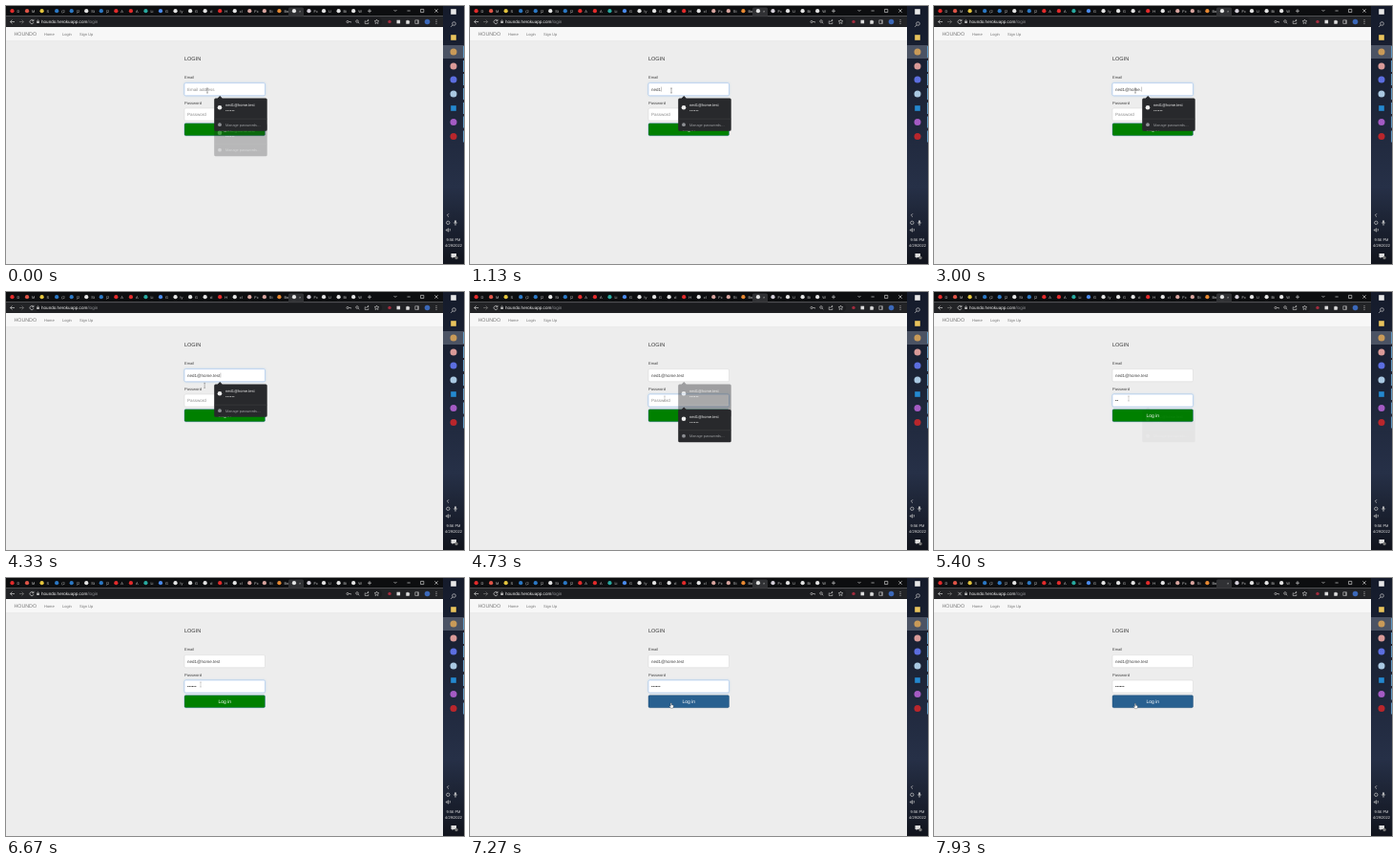
Recreate the animation shown at these times as an HTML page. Size 480 px wide and 270 px high, loop 8000 ms.

```html
<!DOCTYPE html>
<html lang="en">
<head>
<meta charset="utf-8">
<title>Login</title>
<style>
html, body { margin: 0; width: 100%; height: 100%; overflow: hidden; background: #ededed; }
svg { display: block; width: 100vw; height: 100vh; text-rendering: geometricPrecision;
  font: 4px "Liberation Sans", Arial, sans-serif; }
text { white-space: pre; }
.line { fill: none; stroke: #ccc; stroke-width: .7; }
.typed { font-size: 4.5px; }
.field { fill: #fff; stroke: #ccc; stroke-width: .4; }
.field.focus { stroke: #8fb6e8; stroke-width: .45; filter: drop-shadow(0 0 .8px #66afe966); }
</style>
</head>
<body>
<svg viewBox="0 0 480 270">
  <defs>
    <linearGradient id="night" x2="0" y2="1">
      <stop stop-color="#151b2b"/>
      <stop offset=".35" stop-color="#1c2437"/>
      <stop offset=".7" stop-color="#263047"/>
      <stop offset="1" stop-color="#11141d"/>
    </linearGradient>
    <g id="popup">
      <path d="M219.7 96.500h2l2.500-2.500 2.500 2.500h45.500q1.500 0 1.500 1.500v31.200q0 1.500-1.500 1.500h-52.500q-1.500 0-1.500-1.500v-31.200q0-1.500 1.500-1.500z" fill="#28292c"/>
      <path d="M218.200 118.200h55.500" stroke="#404145" stroke-width=".5"/>
      <circle cx="224" cy="106.200" r="2.300" fill="#eee"/>
      <text x="230" y="105" fill="#e8e8e8">ned1@home.test</text>
      <text x="230" y="111.300" fill="#aaa" font-size="4.600">••••••</text>
      <circle cx="224" cy="124.200" r="1.900" fill="#8d8f93"/>
      <text x="230" y="125.900" fill="#9a9c9f" font-size="3.800">Manage passwords…</text>
    </g>
  </defs>

  <!-- page -->
  <rect width="480" height="270" fill="#ededed"/>
  <rect y="22" width="458" height="14.500" fill="#f7f7f7"/>
  <path d="M0 36.600h458" stroke="#e2e2e2" stroke-width=".5"/>
  <g fill="#777">
    <text x="8.500" y="31.400" font-size="5.300">HOUNDO</text>
    <text x="40" y="31">Home</text>
    <text x="59" y="31">Login</text>
    <text x="77" y="31">Sign Up</text>
  </g>
  <g fill="#444">
    <text x="187" y="57" font-size="5.500" fill="#333">LOGIN</text>
    <text x="187" y="76.200">Email</text>
    <text x="187" y="102.700" font-size="4.100">Password</text>
  </g>
  <rect id="emailBox" class="field" x="187" y="80.600" width="84.500" height="13.200" rx="1.400"/>
  <rect id="passBox" class="field" x="187" y="107" width="84.500" height="13" rx="1.400"/>
  <text id="email" class="typed" x="190" y="88.800"/>
  <path id="caret" d="M0 84.600v5" stroke="#555" stroke-width=".4"/>
  <text id="pass" class="typed" x="190" y="115.100"/>
  <rect id="button" x="187" y="122.700" width="84.500" height="13" rx="1.400" stroke-width=".4"/>
  <text x="229.200" y="131" font-size="5" fill="#fff" text-anchor="middle">Log in</text>

  <use id="ghost" href="#popup" y="26.500"/>
  <use id="emailPopup" href="#popup"/>
  <use id="passPopup" href="#popup" y="26.500"/>

  <!-- browser bars -->
  <rect width="458" height="10.500" fill="#0d0e10"/>
  <path d="M296 10.500v-7.500q0-1.500 1.500-1.500h13q1.500 0 1.500 1.500v7.500z" fill="#303134"/>
  <g id="tabs"/>
  <path class="line" d="M379 5.200h4M381 3.200v4M406.500 4l1.500 1.500L409.500 4M420.500 5h3.200M434.600 3.400h3.200v3.200h-3.200zM449.300 3.300l3.400 3.400m0-3.400l-3.400 3.400"/>
  <rect y="10.500" width="458" height="11.500" fill="#222326"/>
  <rect x="31" y="12" width="363" height="8.800" rx="4.400" fill="#1b1c1f"/>
  <path class="line" d="M9 16.500h-4.500m2-2l-2 2 2 2"/>
  <path class="line" style="stroke:#777" d="M14 16.500h4.500m-2-2l2 2-2 2"/>
  <path id="reload" class="line"/>
  <rect x="32.200" y="15.800" width="2.600" height="2.200" fill="#bbb"/>
  <path class="line" style="stroke-width:.5" d="M32.800 15.800v-.8q.7-1.200 1.400 0v.8"/>
  <text x="37" y="18.100" font-size="4.600" fill="#eee">houndo.herokuapp.com<tspan fill="#8b8d91">/login</tspan></text>
  <g class="line" style="stroke-width:.6">
    <circle cx="358" cy="16.500" r="1.100"/><path d="M359 16.500h2.500v1"/>
    <circle cx="368" cy="16" r="1.300"/><path d="M369 17l1.300 1.300"/>
    <path d="M377 15.800h-.800v2.700h3.600v-1.500M377.500 17q.300-2 2.500-2m-1-1l1.200 1-1.200 1"/>
    <path d="M388.500 14l.7 1.600 1.700.1-1.300 1.100.4 1.700-1.500-.9-1.500.9.4-1.700-1.300-1.100 1.700-.1z"/>
    <path d="M428.800 14.800h3.600v3.600h-3.600zM431.600 14.800v3.600"/>
  </g>
  <circle cx="402" cy="16.400" r="1.700" fill="#a32c3d"/>
  <rect x="409.500" y="14.700" width="3.600" height="3.600" fill="#ddd"/>
  <path d="M419.300 15.200h1.100q.6-1.600 1.200 0h1.100v1.100q1.600.6 0 1.200v1.200h-3.400z" fill="#ddd"/>
  <circle cx="441.500" cy="16.500" r="2.800" fill="#3b68b8"/>
  <path d="M451 14.300v4.600" stroke="#ccc" stroke-width=".9" stroke-dasharray=".9"/>

  <!-- taskbar -->
  <rect x="458" width="22" height="270" fill="url(#night)"/>
  <rect x="458" y="41" width="22" height="14" fill="#4b5364"/>
  <g id="apps"/>
  <g class="line">
    <circle cx="469.500" cy="18.500" r="1.800"/><path d="M468.200 19.900l-2 2"/>
    <path d="M464 217.300l-1.700 1.700 1.700 1.700"/>
    <circle cx="463.300" cy="226.800" r="1.700"/>
    <path d="M469.300 226.500q1.700 3.500 3.400 0M471 228.300v1.500"/>
    <path d="M461.300 234h1l1.300-1.200v3.400l-1.300-1.200h-1zM465 233q1 1.300 0 2.600"/>
  </g>
  <rect x="470.200" y="224.200" width="1.600" height="3.200" rx=".8" fill="#ddd"/>
  <g fill="#e5e5e5" text-anchor="middle">
    <text x="469" y="246">9:56 PM</text>
    <text x="469" y="251.500">4/29/2022</text>
  </g>
  <path d="M466.500 259h5.500v4h-3l-1.300 1.300v-1.300h-1.200z" fill="#ddd"/>
  <circle cx="472" cy="263.500" r="1.700" fill="#777"/>

  <path id="beam" d="M-.9-2.500h1.800M0-2.500v5M-.9 2.500h1.800" fill="none" stroke="#333" stroke-width=".45"/>
  <path id="hand" d="M-.6-1.500q.6-.7 1.100 0v1.800l1.900.5v1.500l-.7 1.400h-2.100l-1.400-2 .4-.5.8.6z" fill="#fff" stroke="#222" stroke-width=".3"/>
</svg>
<script>
const $ = id => document.getElementById(id);
const set = (id, attrs) => { for (const k in attrs) $(id).setAttribute(k, attrs[k]); };
const clamp = x => Math.min(1, Math.max(0, x));
const ramp = (t, a, b) => clamp((t - a) / (b - a));
const ease = x => x * x * (3 - 2 * x);

const red = '#e32b2b', blue = '#2b78c5', white = '#e4e4e4', orange = '#e88932';
const tabColors = [red, '#df5547', '#e5c53d', blue, blue, white, blue, red, red, '#28aaa0',
  '#4b8bed', white, white, white, red, white, '#d9a59f', '#d9a59f', orange, white, '#d5d0da', white, white, white];
const tabLabels = 'D M S (2 (2 St (2 A A Li G ly G cl H cl Fc St Bo × Fc U Bi W'.split(' ');
$('tabs').innerHTML = tabColors.map((color, i) => {
  const x = 6.5 + i * 15.55;
  return `<circle ${i === 19 ? 'id="favicon"' : ''} cx="${x}" cy="5.2" r="2.1" fill="${color}"/>
    <text x="${x + 5}" y="6.700" font-size="3.900" fill="#ccc">${tabLabels[i]}</text>`;
}).join('');

const apps = [[6, '#e8e8e8', 1], [33, '#e8c35c', 1], [48, '#c99a58'], [63, '#d99a98'], [77, '#5c6ee0'],
  [92, '#a9c8e2'], [107, '#2489d0', 1], [121.5, '#a45bc4'], [136.5, '#b9262c']];
$('apps').innerHTML = apps.map(([y, color, square], i) =>
  (square ? `<rect x="466.200" y="${y - 2.8}" width="5.600" height="5.600" fill="${color}"/>`
          : `<circle cx="469" cy="${y}" r="3.500" fill="${color}"/>`) +
  (i > 1 ? `<path d="M479.500 ${y - 6}v12" stroke="#609ac4"/>` : '')).join('');

const address = 'ned1@home.test';
const emailKeys = [600, 870, 1000, 1130, 1670, 2200, 2330, 2470, 2600, 2800, 3130, 3200, 3330, 3470];
const passKeys = [5000, 5270, 5670, 5870, 6070, 6330];
const typedCount = (keys, t) => keys.filter(k => k <= t).length;

function fill(id, text, hint) {
  $(id).textContent = text || hint;
  $(id).setAttribute('fill', text ? '#444' : '#8c8c8c');
}

function draw(now) {
  const t = now % 8000, inEmail = t < 4530, loading = t >= 7600;
  const count = typedCount(emailKeys, t);
  fill('email', address.slice(0, count), 'Email address');
  fill('pass', '•'.repeat(typedCount(passKeys, t)), 'Password');
  const end = count ? 190.5 + $('email').getComputedTextLength() : 190;
  set('caret', { transform: `translate(${end})`, opacity: inEmail && count ? .8 : 0 });
  $('emailBox').classList.toggle('focus', inEmail);
  $('passBox').classList.toggle('focus', !inEmail && !loading);

  set('ghost', { opacity: t < 70 ? .27 : 0 });
  set('emailPopup', { opacity: t < 4660 ? 1 : .8 * (1 - ramp(t, 4660, 4800)) });
  set('passPopup', { opacity: t < 4660 ? 0 : (1 - ramp(t, 5250, 5470)) ** 2.8 });

  const toPass = ease(ramp(t, 4200, 4500)), toButton = ease(ramp(t, 6670, 7330));
  const x = 211 - 7 * toPass + 7 * toButton, y = 88.5 + 23 * toPass + 21.5 * toButton;
  const hover = y > 122.7, place = { transform: `translate(${x} ${y})` };
  set('beam', { ...place, opacity: hover ? 0 : .85 - .4 * toPass });
  set('hand', { ...place, opacity: hover ? 1 : 0 });
  set('button', hover ? { fill: '#286090', stroke: '#204d74' } : { fill: 'green', stroke: '#2e6da4' });

  set('favicon', { opacity: loading ? 0 : 1 });
  set('reload', { d: loading ? 'M25.3 14.8l3.4 3.4m0-3.4l-3.4 3.4'
                             : 'M28.7 15.5a2 2 0 1 0 .2 1.6M28.9 14v1.7h-1.7' });
  requestAnimationFrame(draw);
}
requestAnimationFrame(draw);
</script>
</body>
</html>
```
